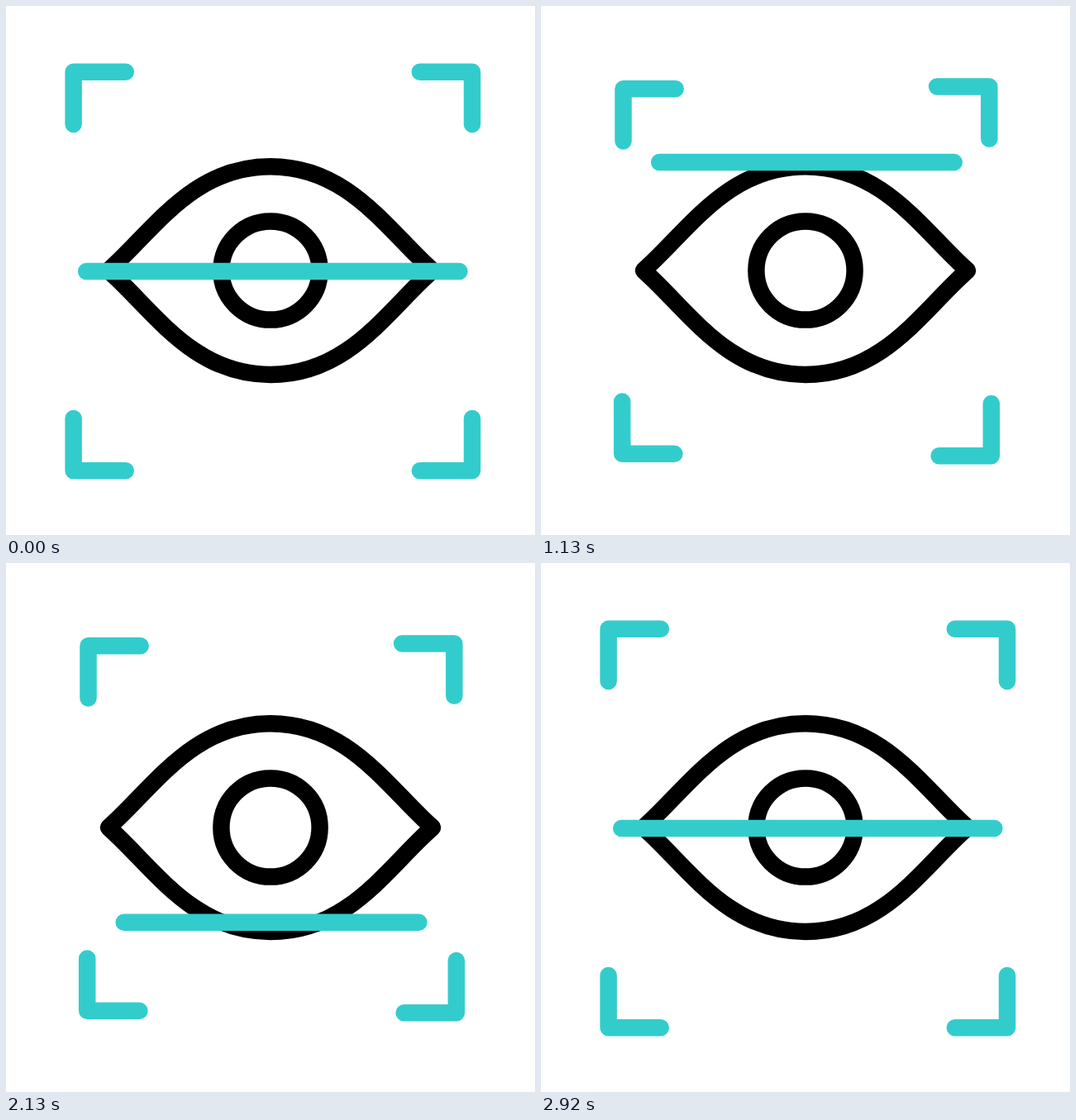
These frames come from a looping animation (640 px wide and 640 px high, 3 s). An HTML page:

```html
<!DOCTYPE html>
<html lang="en">
<head>
<meta charset="utf-8">
<title>Eye scan</title>
<style>
  html, body { margin: 0; width: 100%; height: 100%; overflow: hidden; background: #fff; }
  svg { display: block; width: 100vw; height: 100vh; }
  .ink, .scan { fill: none; stroke-width: 20.5; stroke-linecap: round; stroke-linejoin: round; }
  .ink { stroke: #000; }
  .scan { stroke: #3cc; }
</style>
</head>
<body>
<svg viewBox="0 0 640 640">
  <clipPath id="opening"><path id="openingShape"/></clipPath>
  <g clip-path="url(#opening)"><circle id="iris" class="ink" r="59.6"/></g>
  <path id="lids" class="ink"/>
  <g id="corners"></g>
  <path id="bar" class="scan"/>
</svg>
<script>
const LOOP = 3000;
const FPS = 24;
const LEG = 63.2;

const $ = id => document.getElementById(id);
const mix = (a, b, k) => a + (b - a) * k;

// Piecewise linear value from [step, value] keys.
function track(n, ...keys) {
  if (n <= keys[0][0]) return keys[0][1];
  for (let i = 1; i < keys.length; i++) {
    const [n0, v0] = keys[i - 1], [n1, v1] = keys[i];
    if (n <= n1) return mix(v0, v1, (n - n0) / (n1 - n0));
  }
  return keys[keys.length - 1][1];
}

// Resting elbow, gathered elbow, leg directions, step of arrival.
const corners = [
  { out: [81.6, 79.7], near: [99.5, 100.3], dir: [1, 1], end: 11.7 },
  { out: [564, 79.7], near: [542.3, 97.5], dir: [-1, 1], end: 11.3 },
  { out: [81.6, 562.2], near: [98.2, 541.7], dir: [1, -1], end: 11 },
  { out: [564, 562.2], near: [544.8, 544.3], dir: [-1, -1], end: 11 }
];
for (const c of corners) {
  c.node = document.createElementNS("http://www.w3.org/2000/svg", "path");
  c.node.setAttribute("class", "scan");
  $("corners").append(c.node);
}

// Half of a lid: two control points and the height of its middle.
const lidShape = {
  upper: { open: [180, 270, 226, 194.2, 194.2], shut: [200, 383, 230, 389.3, 389.3] },
  lower: { open: [180, 370, 226, 446, 446], shut: [200, 385, 230, 391.7, 391.7] }
};

function lid({ open, shut }, k, flip) {
  const [x1, y1, x2, y2, mid] = open.map((v, i) => mix(v, shut[i], k));
  const side = x => flip ? 640 - x : x;
  return `C${side(x1)} ${y1} ${side(x2)} ${y2} 320 ${mid}` +
    `C${side(640 - x2)} ${y2} ${side(640 - x1)} ${y1} ${side(516)} 320`;
}

function drawEye(n) {
  const shut = track(n, [1, 0], [11, 1], [20, 0]);
  const d = "M124 320" + lid(lidShape.upper, shut) + lid(lidShape.lower, shut, true) + "Z";
  $("lids").setAttribute("d", d);
  $("openingShape").setAttribute("d", d);
  const glance = track(n, [52, 0], [57, 1], [60, 1], [70, 0]);
  $("iris").setAttribute("cx", 320 + 5.6 * glance);
  $("iris").setAttribute("cy", 320 + 18.5 * glance);
}

function drawCorners(n) {
  for (const { out, near, dir, end, node } of corners) {
    const k = track(n, [1, 0], [end, 1], [61, 1], [70, 0]);
    const [x, y] = out.map((v, i) => mix(v, near[i], k));
    node.setAttribute("d", `M${x} ${y + dir[1] * LEG}V${y}H${x + dir[0] * LEG}`);
  }
}

function drawBar(n) {
  const y = track(n, [14, 321], [20, 158.3], [24, 158.3], [56, 486], [61, 486], [70, 321]);
  const mid = track(n, [14, 322.8], [20, 321.5], [24, 321.5], [56, 320.9], [61, 320.9], [70, 322.8]);
  const half = track(n, [14, 225.6], [20, 178.3], [61, 178.3], [70, 225.6]);
  $("bar").setAttribute("d", `M${mid - half} ${y}H${mid + half}`);
}

function render(ms) {
  const n = Math.floor((ms % LOOP) * FPS / 1000 + 0.2);
  drawEye(n);
  drawCorners(n);
  drawBar(n);
}

const start = performance.now();
function tick() {
  render(performance.now() - start);
  requestAnimationFrame(tick);
}
tick();
</script>
</body>
</html>
```
